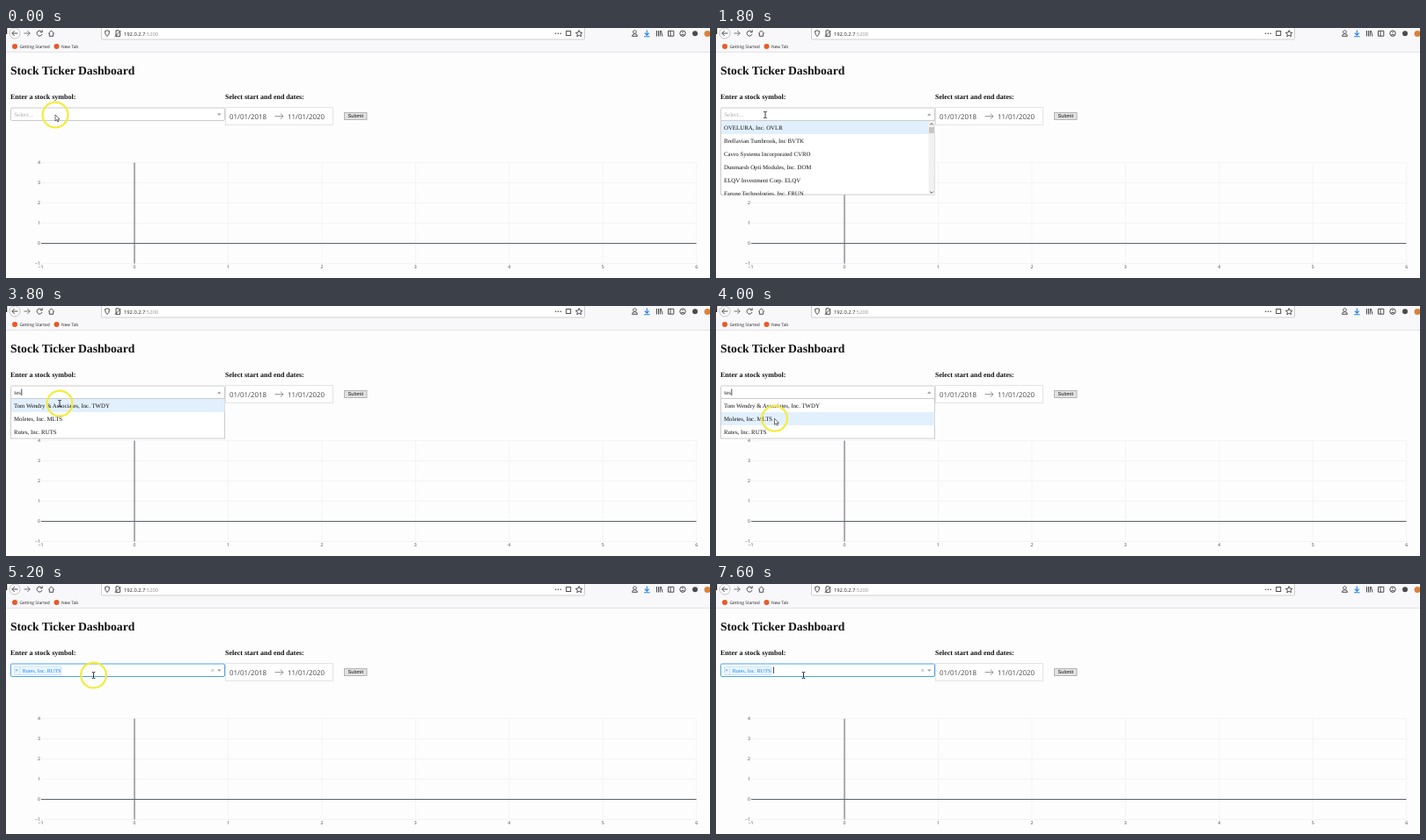
Write an HTML page that moves like this. It is 800 px wide and 285 px high and loops after 8 s.

```html
<!DOCTYPE html>
<html lang="en">
<head>
<meta charset="utf-8">
<title>Stock Ticker Dashboard</title>
<style>
  html, body { margin: 0; width: 100%; height: 100%; overflow: hidden; background: #fefdfe; }
  svg { display: block; width: 100%; height: 100%; }
  text { font-family: "Liberation Serif", serif; text-rendering: geometricPrecision; white-space: pre; }
  .ui { font-family: "Open Sans", sans-serif; }
  .button { font-family: "Liberation Sans", sans-serif; }
  .bold { font-weight: bold; }
  .end { text-anchor: end; }
  .mid { text-anchor: middle; }
  .icon { fill: none; stroke: #4a4a4f; stroke-width: 1; }
</style>
</head>
<body>
<svg viewBox="0 0 800 285">
  <clipPath id="menuClip"><rect x="5" y="105" width="244" height="85.5"/></clipPath>
  <g id="browser"></g>
  <g id="page"></g>
  <g id="live"></g>
</svg>
<script>
const LOOP = 8000, STEP = 200, BLINK = 1060;
const OPEN = 400, SELECT = 4400, ROW = 15, MENU_TOP = 106;
const companies = [
  "OVELURA, Inc. OVLR",
  "Brellavian Tumbrook, Inc BVTK",
  "Cavro Systems Incorporated CVRO",
  "Dunmarsh Opti Modules, Inc. DOM",
  "ELQV Investment Corp. ELQV",
  "Farune Technologies, Inc. FRUN",
  "Tom Wendry & Associates, Inc. TWDY",
  "Moletes, Inc. MLTS",
  "Rutes, Inc. RUTS",
];
const choice = companies[8];

const text = (x, y, size, string, fill = "#111", cls = "") =>
  `<text x="${x}" y="${y}" font-size="${size}" fill="${fill}" class="${cls}">${string.replace("&", "&amp;")}</text>`;
const rect = (x, y, w, h, fill, stroke = "none", r = 0) =>
  `<rect x="${x}" y="${y}" width="${w}" height="${h}" rx="${r}" fill="${fill}" stroke="${stroke}"/>`;
const circle = (x, y, r, fill, stroke = "none", width = 1) =>
  `<circle cx="${x}" cy="${y}" r="${r}" fill="${fill}" stroke="${stroke}" stroke-width="${width}"/>`;
const path = (d, stroke, width = 1, fill = "none") =>
  `<path d="${d}" fill="${fill}" stroke="${stroke}" stroke-width="${width}"/>`;
const icon = (d, extra = "") => `<path class="icon" d="${d}" ${extra}/>`;
const show = (id, parts) => document.getElementById(id).innerHTML = parts.join("");

function drawBrowser() {
  show("browser", [
    rect(0, 0, 800, 27, "#f8f8fa"),
    path("M0 27.5H800", "#e3e3e6"),
    rect(0, 0, 1.2, 7, "#222"),
    circle(10, 6, 6, "#fdfdfe", "#b5b5b9", 0.8),
    icon("M13.5 6H7M9.7 3L6.7 6L9.7 9"),
    icon("M20.5 6H27M24.3 3L27.3 6L24.3 9", 'opacity=".75"'),
    icon("M40.6 4.4A3 3 0 1 0 41 7M41.2 2.4V4.8H38.8"),
    icon("M48.2 6.3L51.5 3L54.8 6.3M49.3 6V9.3H53.7V6"),
    rect(108.5, -1, 549, 14, "#fff", "#cfcfd3", 1),
    icon("M112.5 3.6L115 2.8L117.5 3.6Q117.5 8 115 9.5Q112.5 8 112.5 3.6Z"),
    icon("M125 2.8H128.2L129.6 4.3V9.4H125ZM123.8 9.8L130.4 3"),
    text(134, 8.6, 5.75, '192.0.2.7<tspan fill="#929296">:5200</tspan>', "#222", "ui"),
    ...[624.7, 627.5, 630.3].map(x => circle(x, 6.3, 0.8, "#4a4a4f")),
    rect(636.7, 3.5, 5, 5, "none", "#4a4a4f"),
    icon("M651.2 2.6L652.3 5.1L655 5.3L653 7.1L653.6 9.7L651.2 8.3L648.8 9.7L649.4 7.1L647.4 5.3L650.1 5.1Z"),
    icon("M714.5 2.7A1.8 1.8 0 1 1 714.4 2.7M711.5 9.3Q711.5 6.7 714.5 6.7Q717.5 6.7 717.5 9.3Z"),
    path("M728.3 2.5V8M725.8 5.7L728.3 8.2L730.8 5.7M725 9.7H731.6", "#1d82e8", 1.1),
    icon("M739.5 3V9.5M741.5 3V9.5M743.3 3V9.5M744.3 3L746 9.5"),
    icon("M752.5 3.3H758.8V9.2H752.5ZM755 3.3V9.2"),
    circle(769, 6.2, 3.2, "none", "#4a4a4f"),
    icon("M767 8.3Q769 6.3 771 8.3M769 4.2V5.8"),
    circle(783, 6.2, 3, "#4a4a4f"),
    circle(797, 6.5, 3.5, "#d9823c"),
    circle(10, 21, 3, "#e85b2b"),
    text(15.5, 22.8, 4.85, "Getting Started", "#222", "ui"),
    circle(57.5, 21, 3, "#e85b2b"),
    text(63, 22.8, 4.85, "New Tab", "#222", "ui"),
  ]);
}

function drawPage() {
  const columns = [0, 1, 2, 3, 4, 5, 6], rows = [4, 3, 2, 1, 0, -1];
  const px = value => 146 + value * 106.45, py = value => 245.5 - value * 23;
  const label = value => String(value).replace("-", "−");
  show("page", [
    text(5, 52.5, 13.6, "Stock Ticker Dashboard", "#111", "bold"),
    text(5, 80.5, 8, "Enter a stock symbol:", "#111", "bold"),
    text(249, 80.5, 8, "Select start and end dates:", "#111", "bold"),
    rect(249.5, 90.5, 122, 20, "#fff", "#e3e3e5"),
    text(254, 104, 7.95, "01/01/2018", "#484848", "ui"),
    text(320, 104, 7.95, "11/01/2020", "#484848", "ui"),
    path("M305.5 100.7H315M311.8 97.5L315 100.7L311.8 103.9", "#777", 0.8),
    rect(384.5, 96.5, 25.5, 8, "#e2e2e2", "#b5b5b5"),
    text(397.3, 102.4, 5.6, "Submit", "#111", "button mid"),
    ...columns.map(c => path(`M${px(c)} 153.5V268.5`, "#f3f3f5")),
    ...rows.map(r => path(`M40 ${py(r)}H784.5`, "#f3f3f5")),
    path("M146 153.5V268.5M40 245.5H784.5", "#5d636a"),
    ...[-1, ...columns].map(c => text(px(c), 274.2, 5.2, label(c), "#444", "ui mid")),
    ...rows.map(r => text(39, py(r) + 1.9, 5.2, label(r), "#444", "ui end")),
  ]);
}

const typed = t => "tes".slice(0, t < 2200 ? 0 : Math.floor((t - 2200) / STEP) + 1);

// The caret restarts its blink after the click, the last key and the selection.
function caretOn(t) {
  if (t < OPEN) return false;
  if (t >= 2200 && t < 2740) return true;
  const start = t >= SELECT ? SELECT : t >= 2740 ? 2740 : 140;
  return (t - start) % BLINK < BLINK / 2;
}

function pointerAt(t) {
  const stops = [[0, 56, 99], [3600, 56, 99], [3800, 61, 111], [4200, 72, 145.5],
                 [4600, 72, 145.5], [4800, 76, 139], [5200, 99.5, 104], [LOOP, 99.5, 104]];
  const i = stops.findIndex(stop => stop[0] > t);
  const [t0, x0, y0] = stops[i - 1], [t1, x1, y1] = stops[i];
  const k = (t - t0) / (t1 - t0);
  return [x0 + (x1 - x0) * k, y0 + (y1 - y0) * k];
}

function menu(query, pointerY) {
  const found = companies.filter(name => name.toLowerCase().includes(query));
  const height = Math.min(found.length * ROW, 84);
  const hovered = Math.max(0, Math.min(found.length - 1, Math.floor((pointerY - MENU_TOP) / ROW)));
  const parts = [
    rect(5.5, 105.5, 243, height + 0.5, "#fff", "#ccc"),
    '<g clip-path="url(#menuClip)">',
    rect(6, MENU_TOP + hovered * ROW, 242.5, ROW, "#e2f0fd"),
    ...found.map((name, i) => text(9, MENU_TOP + i * ROW + 9.7, 6.83, name)),
    "</g>",
  ];
  if (found.length * ROW > 84) parts.push(
    rect(241.5, 106, 7, 84, "#f1f1f1"),
    rect(242, 113, 6, 7, "#c6c6c6"),
    path("M243.2 110.5L245 108.7L246.8 110.5M243.2 186.5L245 188.3L246.8 186.5", "#555"));
  return parts.join("");
}

function dropdown(t, pointerY) {
  const open = t >= OPEN && t < SELECT, selected = t >= SELECT, query = typed(t);
  const parts = [rect(5.5, 91, 243, 14.5, "#fff", selected ? "#46a3e4" : "#ccc", 1.5)];
  if (selected) parts.push(
    rect(9.5, 94, 53.5, 9.5, "#ebf5ff", "#c9e3fb", 1),
    path("M15.5 94V103.5", "#c9e3fb"),
    path("M10.9 97.2L13.1 99.4M13.1 97.2L10.9 99.4", "#3d97ea", 0.7),
    text(18.7, 100.8, 6.15, choice, "#1686ee"));
  else parts.push(text(9.3, 100.7, 6.83, query || "Select...", query ? "#222" : "#aaa"));
  if (t > SELECT) parts.push(path("M233.2 96.9L236.2 99.9M236.2 96.9L233.2 99.9", "#999", 0.7));
  parts.push(path(open ? "M240 99.7H244.6L242.3 97.4Z" : "M240 97.4H244.6L242.3 99.7Z", "none", 0, "#999"));
  if (caretOn(t)) {
    const x = selected ? 65.5 : [10, 12.2, 15.2, 17.8][query.length];
    parts.push(path(`M${x} 94.5V102`, "#222", 0.8));
  }
  if (open) parts.push(menu(query, pointerY));
  return parts.join("");
}

function pointer(t, x, y) {
  const clicking = t === 200 || t === SELECT;
  const ringed = t < 1200 || (t >= 3800 && t < 6200);
  const arrow = t < OPEN || (t >= 4000 && t < 5000);
  const ring = clicking ? circle(x, y, 4, "#dce9f7", "#3f76b5", 1.7)
    : ringed ? circle(x, y, 14.4, "none", "#f3ec3d", 2.2) : "";
  const shape = arrow
    ? path("M0 0V7L1.7 5.5L2.8 8L4 7.4L2.9 5.1H5Z", "#333", 0.7, "#fff")
    : path("M-1.8 -3.5H-.5L0 -3L.5 -3.5H1.8M0 -3V3M-1.8 3.5H-.5L0 3L.5 3.5H1.8", "#222", 0.9);
  return `${ring}<g transform="translate(${x} ${y})">${shape}</g>`;
}

let shown = -1;
function frame(now) {
  const t = Math.floor(now % LOOP / STEP) * STEP;
  if (t !== shown) {
    const [x, y] = pointerAt(t);
    show("live", [dropdown(t, y), pointer(t, x, y)]);
    shown = t;
  }
  requestAnimationFrame(frame);
}

drawBrowser();
drawPage();
const begin = performance.now();
const tick = now => frame(Math.max(0, now));
frame(0);
</script>
</body>
</html>
```
